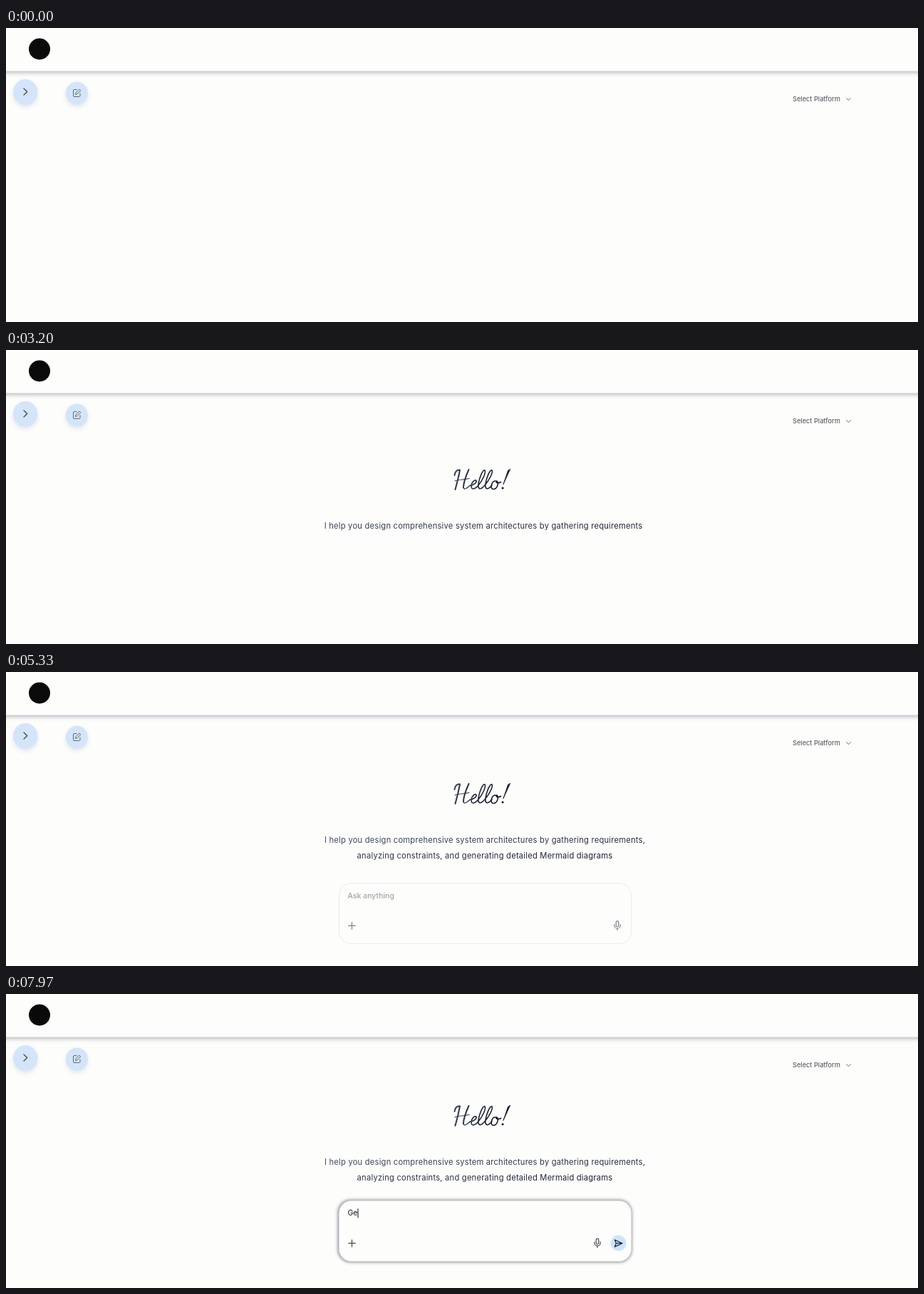
These frames come from a looping animation (1280x413 px, 8 s). An HTML page:

```html
<!DOCTYPE html>
<html lang="en">
<head>
<meta charset="utf-8">
<title>Assistant welcome screen</title>
<style>
  html, body { margin: 0; width: 100%; height: 100%; overflow: hidden; background: #fdfdfc; }
  svg { position: absolute; left: 0; top: 0; font-family: Inter, sans-serif; }
  .line { fill: none; stroke: #3f4450; stroke-width: 1.2; stroke-linecap: round; stroke-linejoin: round; }
  .fine { stroke: #626874; stroke-width: 1; }
  .header { fill: #fdfdfc; filter: drop-shadow(0 2px 3px rgba(20, 25, 50, .32)); }
  .button { fill: #d4e5fa; filter: drop-shadow(0 3px 3px rgba(40, 60, 100, .12)); }
  .halo { fill: #777a84; filter: blur(2.2px); }
  #intro {
    position: absolute; left: 672px; margin: 0; transform: translateX(-50%);
    width: max-content; white-space: pre; text-align: center;
    font: 11.2px/22px Inter, sans-serif; letter-spacing: .21px;
    color: transparent; background: linear-gradient(to bottom right, #4b5568, #0d1220);
    -webkit-background-clip: text; background-clip: text;
  }
  #intro.typing::after { content: ""; display: inline-block; width: 4px; }
</style>
</head>
<body>
<svg width="1280" height="413" viewBox="0 0 1280 413">
  <defs>
    <linearGradient id="ink" gradientUnits="userSpaceOnUse" x1="628" y1="167" x2="708" y2="197">
      <stop stop-color="#364152"/><stop offset="1" stop-color="#070b16"/>
    </linearGradient>
  </defs>

  <rect class="header" x="-10" y="-10" width="1300" height="70.5"/>
  <circle cx="47" cy="29.5" r="15" fill="#0a0a0a"/>

  <ellipse class="button" cx="27.2" cy="90" rx="17.2" ry="18"/>
  <path class="line" d="M25 85l4.700 4.500L25 94"/>
  <ellipse class="button" cx="99.4" cy="91.6" rx="15.5" ry="16.2"/>
  <path class="line fine" d="M99 86.500h-3a1.500 1.500 0 0 0-1.500 1.500v7a1.500 1.500 0 0 0 1.500 1.500h6.500a1.500 1.500 0 0 0 1.500-1.500v-3M103 86.200l1.700 1.700-5 5-2.200.5.5-2.200z"/>

  <text x="1104" y="103" font-size="9.2" font-weight="500" fill="#606168">Select Platform</text>
  <path class="line fine" d="M1179.500 98.700l3 3 3-3"/>

  <g id="hello" role="img" aria-label="Hello!" fill="none" stroke="url(#ink)" stroke-linecap="round" stroke-linejoin="round">
    <path stroke-width="2" d="M629.500 176C630 171 633 168 637 168.500C635.500 177 633 187 630.500 196M649.500 168C645.500 177 642 187 642 193"/>
    <path stroke-width="1.200" d="M630 184C636.500 181.500 643 182.500 650 180.500M642 193C642.500 197 646.500 194.500 651 190.500"/>
    <path stroke-width="1.600" d="M651 190.500C657 189.500 661 186 660 183.500C658 181.500 653 186 653 191C653 197 658 196 663 190
      C669 183 674 172 672 169C669 167 664 181 663 188C662 196 666 197 672 190
      C678 183 684 172 682 169C679 167 674 181 673 188C672 196 676 197 682 190"/>
    <path stroke-width="1.600" d="M687 184C681.500 184 679 194 683.500 195.500C689.500 196 692.500 186 688.500 184C686.500 186 690.500 188 694.500 185.500"/>
    <path fill="url(#ink)" stroke-width=".8" d="M707.500 167.500L704.500 169.500L698 188.500Z"/>
    <circle fill="url(#ink)" stroke-width=".6" cx="697" cy="194" r="1.200"/>
  </g>

  <g id="prompt">
    <rect id="halo" class="halo" x="465.500" y="290" width="413" height="88" rx="18"/>
    <rect id="box" x="467.500" y="291.500" width="410" height="85" rx="17" fill="#fdfdfc" stroke="#dfe0e6"/>
    <text id="entry" x="479.500" y="312.300" font-size="10.500"></text>
    <path id="caret" d="M480 302.500v13" stroke="#111"/>
    <path class="line" d="M480.700 351.200h9.600M485.500 346.400v9.600"/>
    <g id="mic">
      <path class="line" style="stroke-width:2" d="M9 5a3 3 0 0 1 6 0v7a3 3 0 0 1-6 0zM19 10v2a7 7 0 0 1-14 0v-2M12 19v4"/>
    </g>
    <g id="send">
      <circle cx="859.500" cy="351" r="11" fill="#cfe3fa"/>
      <path class="line" style="stroke:#1c2433" d="M854.300 346.300l10.700 4.900-10.700 4.900 2-4.900zM856.300 351.200h8.700"/>
    </g>
  </g>
</svg>
<p id="intro"></p>

<script>
const LOOP = 8000;
const FIRST = "I help you design comprehensive system architectures by gathering requirements,";
const INTRO = FIRST + " analyzing constraints, and generating detailed Mermaid diagrams";
const TYPE_START = 846.5, TYPE_STEP = 30.1;
const FOCUS = 6600, KEYS = [7690, 7880];

const $ = id => document.getElementById(id);
const [hello, intro, prompt, halo, box, entry, caret, mic, send] =
  ["hello", "intro", "prompt", "halo", "box", "entry", "caret", "mic", "send"].map($);
const progress = (t, start, length) => Math.min(1, Math.max(0, (t - start) / length));
const easeOut = p => 1 - (1 - p) ** 3;
const show = (el, visible) => el.setAttribute("visibility", visible ? "inherit" : "hidden");

function drawIntro(t) {
  const count = Math.min(INTRO.length, Math.max(0, Math.floor((t - TYPE_START) / TYPE_STEP)));
  const wrapped = count > FIRST.length + 1;
  intro.textContent = wrapped
    ? FIRST + "\n" + INTRO.slice(FIRST.length + 1, count)
    : INTRO.slice(0, count);
  intro.className = count < INTRO.length ? "typing" : "";
  intro.style.top = (wrapped ? 225 : 236) + "px";
  hello.setAttribute("transform", `translate(0 ${wrapped ? -11 : 0})`);
  hello.setAttribute("opacity", easeOut(progress(t, 370, 460)));
}

function drawPrompt(t) {
  const enter = easeOut(progress(t, 5160, 550));
  const focus = easeOut(progress(t, FOCUS, 250));
  prompt.setAttribute("opacity", enter);
  prompt.setAttribute("transform", `translate(0 ${16 * (1 - enter) - focus})`);
  halo.setAttribute("opacity", focus * .8);
  box.setAttribute("stroke-opacity", 1 - focus * .6);

  const typed = "Ge".slice(0, KEYS.filter(k => t >= k).length);
  entry.textContent = typed || "Ask anything";
  entry.setAttribute("fill", typed ? "#16181d" : "#777980");
  entry.setAttribute("font-weight", typed ? 400 : 500);
  const sinceKey = t - Math.max(FOCUS, ...KEYS.filter(k => t >= k));
  show(caret, t >= FOCUS && sinceKey % 1000 < 500);
  const caretX = typed ? entry.getComputedTextLength() : 0;
  caret.setAttribute("transform", `translate(${Math.round(caretX)} 0)`);

  show(send, typed);
  mic.setAttribute("transform", `translate(${typed ? 822.8 : 850.8} 343.5) scale(.6)`);
}

function frame(now) {
  const t = now % LOOP;
  drawIntro(t);
  drawPrompt(t);
  requestAnimationFrame(frame);
}
frame(0);
</script>
</body>
</html>
```
